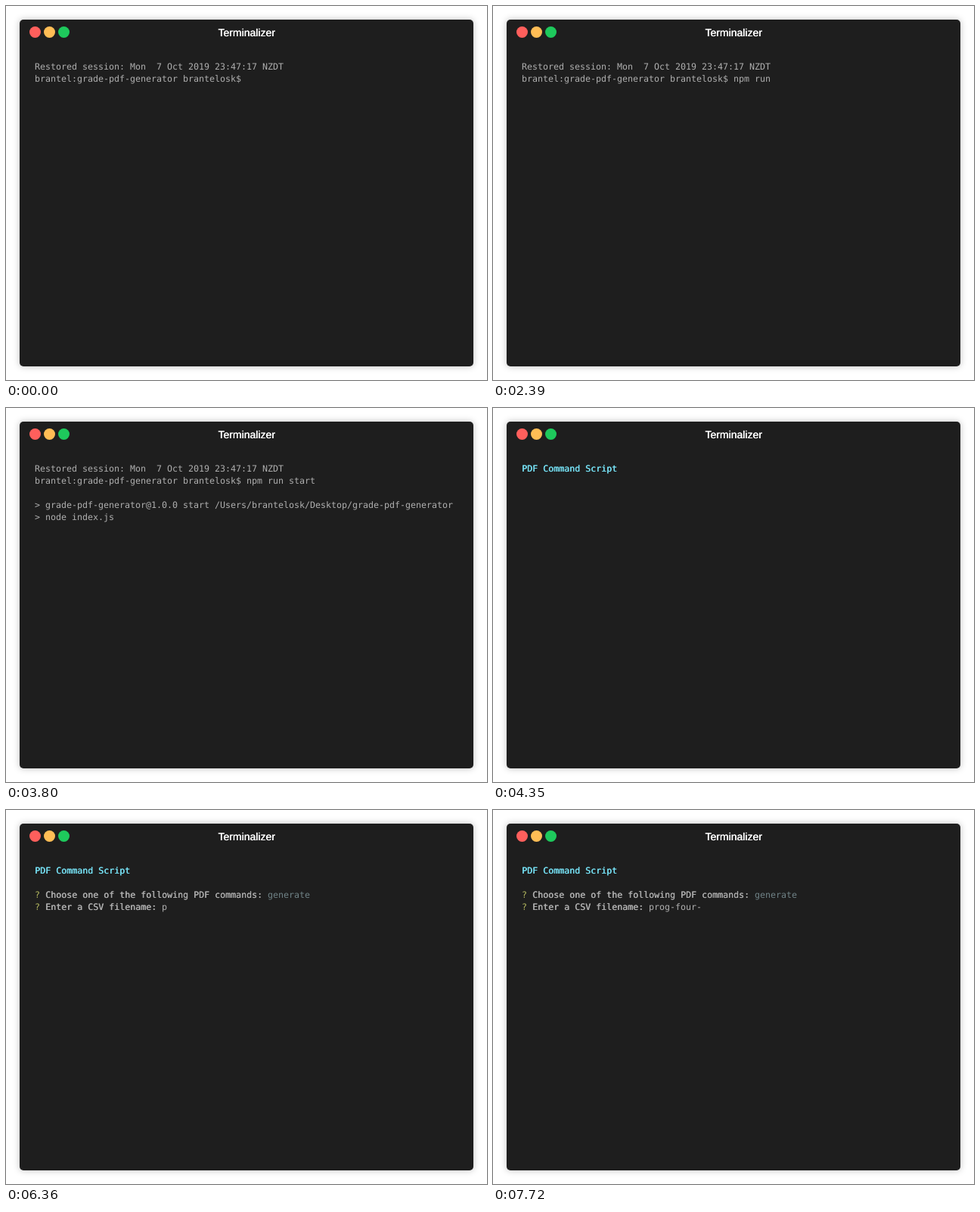
Animation, 636 px wide and 494 px high, one loop 8 s. Source, as an HTML page with a canvas:

```html
<!DOCTYPE html>
<html lang="en">
<head>
<meta charset="utf-8">
<title>Terminal</title>
<style>
  html, body { margin: 0; width: 100%; height: 100%; overflow: hidden; background: #fff; }
  canvas { display: block; }
</style>
</head>
<body>
<canvas id="stage" width="636" height="494"></canvas>
<script>
const ctx = document.getElementById('stage').getContext('2d');
const LOOP = 8000, CELL = 7, LINE = 16, LEFT = 38, BASE = 84;
const MONO = '11.63px "DejaVu Sans Mono", monospace';
const TITLE = '14px "Liberation Sans", Arial, sans-serif';
const GREY = '#afafaf', DIM = '#6c6c6c', TEAL = '#708387', BLUE = '#75dff2';
const AMBER = '#c9a04a', LIME = '#b5ba60';

const HOST = 'brantel', USER = 'brantelosk', PROJECT = 'grade-pdf-generator';
const COMMAND = 'npm run start', ANSWER = 'prog-four-';

// Time at which each character appears; a space comes with the key after it.
const commandKeys = [1490, 1670, 1850, 2160, 2160, 2240, 2390, 2730, 2730, 2840, 2950, 3050, 3160];
const answerKeys = [6360, 6480, 6590, 6690, 6950, 7060, 7170, 7350, 7430, 7720];
const RUN = 3800, CLEAR = 4350, ASK = 4450, CHOSEN = 5380;

const typed = (text, keys, t) => text.slice(0, keys.filter(k => k <= t).length);
const span = (text, color = GREY, bold = false) => ({ text, color, bold });

function shellRows(t) {
  const rows = [
    [span('Restored session: Mon  7 Oct 2019 23:47:17 NZDT')],
    [span(`${HOST}:${PROJECT} ${USER}$ ${typed(COMMAND, commandKeys, t)}`)]
  ];
  if (t >= RUN) rows.push(
    [],
    [span(`> ${PROJECT}@1.0.0 start /Users/${USER}/Desktop/${PROJECT}`)],
    [span('> node index.js')]
  );
  return rows;
}

function promptRows(t) {
  const rows = [[span('PDF Command Script', BLUE, true)], []];
  const question = (text, color) => [span('? ', color), span(text + ' ', GREY, true)];
  const choose = 'Choose one of the following PDF commands:';
  if (t >= CHOSEN) rows.push(
    [...question(choose, LIME), span('generate', TEAL)],
    [...question('Enter a CSV filename:', LIME), span(typed(ANSWER, answerKeys, t))]
  );
  else if (t >= ASK) rows.push(
    [...question(choose, AMBER), span('(Use arrow keys)', DIM)],
    [span('❯ ', TEAL), span('generate', TEAL)],
    [span('  merge')],
    [span('  send')]
  );
  return rows;
}

function write(text, x, y, color, bold) {
  ctx.fillStyle = color;
  ctx.fillText(text, x, y);
  if (bold) ctx.fillText(text, x + 0.4, y);
}

function drawWindow() {
  ctx.fillStyle = '#fff';
  ctx.fillRect(0, 0, 636, 494);
  ctx.save();
  ctx.shadowColor = 'rgba(0, 0, 0, 0.25)';
  ctx.shadowBlur = 10;
  ctx.fillStyle = '#1e1e1e';
  ctx.beginPath();
  ctx.roundRect(18, 18, 600, 458, 5);
  ctx.fill();
  ctx.restore();
  ['#ff5f5c', '#ffbd55', '#1ec95c'].forEach((color, i) => {
    ctx.fillStyle = color;
    ctx.beginPath();
    ctx.arc(38.5 + 19 * i, 34.5, 7.5, 0, Math.PI * 2);
    ctx.fill();
  });
  ctx.font = TITLE;
  ctx.textAlign = 'center';
  write('Terminalizer', 318, 40, '#fff', true);
}

function draw(t) {
  drawWindow();
  ctx.font = MONO;
  ctx.textAlign = 'left';
  (t < CLEAR ? shellRows(t) : promptRows(t)).forEach((row, i) => {
    let column = 0;
    for (const { text, color, bold } of row) {
      write(text, LEFT + column * CELL, BASE + i * LINE, color, bold);
      column += text.length;
    }
  });
}

ctx.textRendering = 'geometricPrecision';
const start = performance.now();
function tick() {
  draw((performance.now() - start) % LOOP);
  requestAnimationFrame(tick);
}
tick();
</script>
</body>
</html>
```
